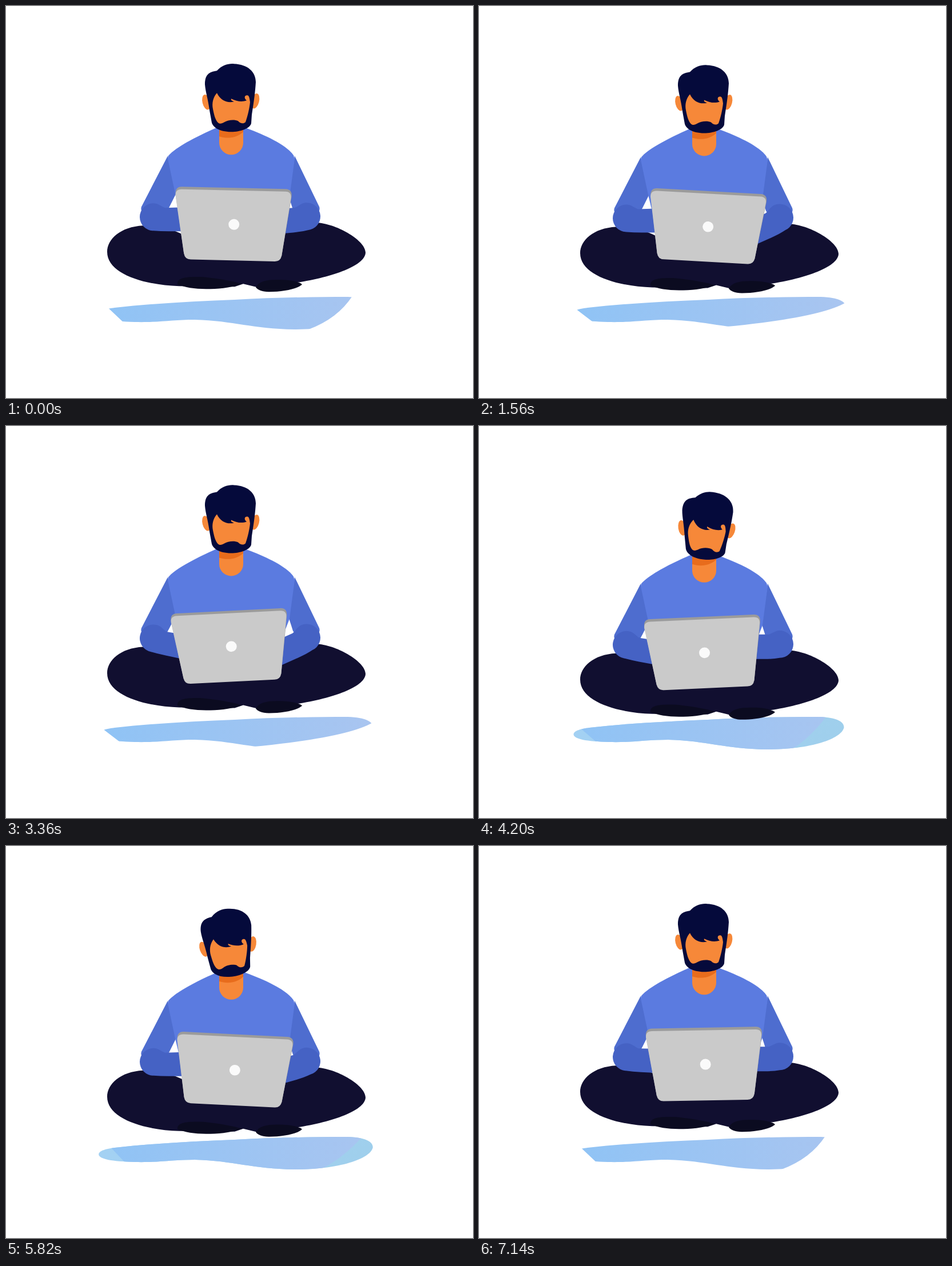
Animation of 817 by 686 pixels, one loop 7200 ms. Source, as an HTML page:

```html
<!DOCTYPE html>
<html lang="en">
<head>
<meta charset="utf-8">
<title>Working cross-legged</title>
<style>
  html, body { margin: 0; width: 100%; height: 100%; overflow: hidden; background: #fff; }
  svg { display: block; width: 100vw; height: 100vh; }
</style>
</head>
<body>
<svg viewBox="0 0 817 686">
  <defs>
    <linearGradient id="coreFill">
      <stop offset="0" stop-color="#8fc3f5"/><stop offset="1" stop-color="#a9c5f0"/>
    </linearGradient>
    <linearGradient id="endFill">
      <stop offset="0" stop-color="#a3d1f3"/><stop offset="1" stop-color="#9fcfec"/>
    </linearGradient>
    <path id="pool" d="M162,540C162,533 175,530 190,528C260,520 330,517 400,514C470,510 540,509 598,509C630,510 642,518 642,527C640,545 590,566 505,566C430,565 400,551 330,549C290,549 270,554 225,553C185,552 163,548 162,540Z"/>
    <clipPath id="coreClip"><path id="cut"/></clipPath>
  </defs>

  <g id="shadow">
    <use id="ends" href="#pool" fill="url(#endFill)"/>
    <g clip-path="url(#coreClip)"><use href="#pool" fill="url(#coreFill)"/></g>
  </g>

  <g id="body">
    <path fill="#110f30" d="M240,384C200,386 177,408 177,430C177,468 240,488 303,490L400,491L415,486L440,492L514,483C580,472 629,452 629,431C629,411 582,382 545,379L480,386V400H310C290,390 265,384 240,384Z"/>
    <g fill="#0b0b20">
      <path d="M300,487C298,474 320,473 345,474C375,477 400,482 413,486C390,494 370,495 350,495C330,495 312,492 300,487Z"/>
      <path d="M437,492C443,480 460,478 485,479C505,480 515,484 518,487C510,495 485,500 460,500C447,500 440,496 437,492Z"/>
    </g>
    <g fill="#4e6dcf">
      <path d="M283,262L237,351Q234,360 245,366L280,362L286,351L297,329Z"/>
      <path d="M505,262L548,351Q551,360 540,366L506,362L502,356L495,334Z"/>
    </g>
    <path fill="#5b7be0" d="M370,212C340,225 297,246 284,262L283,267L296,328L302,353H489L496,335L505,267L503,261C490,242 450,224 416,212Z"/>
    <path id="leftArm" fill="#4562c4" d="M258,393A24,24 0 0 1 258,345C266,345 271,350 278,353L340,351V394H285Q270,394 258,393Z"/>
    <path id="rightArm" fill="#4562c4" d="M526,392A24,24 0 0 0 526,344C518,344 513,350 506,351H440V394H500Q515,394 526,392Z"/>
    <path fill="#f68839" d="M373,195H415V239A21,21 0 0 1 373,239Z"/>
    <path fill="#e86c1c" d="M373,205H415V220C405,230 388,233 373,228Z"/>

    <g id="head">
      <g fill="#f68839">
        <ellipse cx="350.5" cy="168" rx="6.8" ry="13.5" transform="rotate(-14 350.5 168)"/>
        <ellipse cx="436" cy="166" rx="6.8" ry="13.5" transform="rotate(14 436 166)"/>
      </g>
      <path fill="#050a3b" d="M348,137C348,120 355,115 369,113C378,103 390,100 399,101C423,102 437,115 437,133C436,150 434,165 430,190L429,205C427,214 410,220 394,220C372,220 362,211 360,204L356,182C353,160 349,150 348,137Z"/>
      <path fill="#f68839" d="M369,152C362,160 360,170 362,180C364,190 366,199 371,204C375,207 378,205 382,203C388,199 400,198 406,201C410,206 416,206 419,203C423,192 426,178 427,168C426,160 425,156 422,156C417,156 416,161 421,165C413,168 404,167 394,162C393,164 395,166 399,167C388,170 376,166 369,152Z"/>
    </g>

    <g id="laptop">
      <path fill="#9b9b9b" d="M305,318H486Q498,318 497,331L482,435H311L294,331Q293,318 305,318Z"/>
      <path fill="#cacaca" d="M305,322.500H486Q497,322.500 496,334L482,435Q480,445 470,445H323Q313,445 311,435L294,334Q293,322.500 305,322.500Z"/>
      <circle cx="397.300" cy="382" r="9.500" fill="#fafafa"/>
    </g>
  </g>
</svg>
<script>
const STEP = 60, LOOP = 7200, DROP = 17.2;
const el = id => document.getElementById(id);
const set = (id, name, value) => el(id).setAttribute(name, value);
const turn = (id, angle, x, y, tall = 1) => set(id, 'transform',
  `translate(${x} ${y}) rotate(${angle}) scale(1 ${tall}) translate(${-x} ${-y})`);
const linear = u => u;
const smooth = u => (1 - Math.cos(Math.PI * u)) / 2;

// Each key is [position, ...values]
function keyed(keys, p, ease = smooth) {
  if (p <= keys[0][0]) return keys[0].slice(1);
  for (let i = 1; i < keys.length; i++) {
    const a = keys[i - 1], b = keys[i];
    if (p <= b[0]) {
      const k = ease((p - a[0]) / (b[0] - a[0]));
      return a.slice(1).map((v, j) => v + (b[j + 1] - v) * k);
    }
  }
  return keys[keys.length - 1].slice(1);
}

const headKeys = [[240, 0], [600, 4.8], [1140, 4.8], [1440, 0], [1800, 0], [2130, -4.8], [2700, -4.8], [3060, 0]];
const leftKeys = [[330, 0], [510, 12], [600, 12], [735, 0]];
const rightKeys = [[0, 0], [30, 5], [90, 16], [150, 24], [210, 0]];
// Body drop, then x of the shadow's left cut and of the right cut's top, bottom and bend
const cutKeys = [
  [0, 151, 600, 547, 575], [2.4, 130, 655, 375, 625], [5, 160, 650, 600, 625],
  [8.5, 158, 625, 550, 590], [17, 130, 603, 548, 575]
];

function draw(now) {
  const t = Math.floor(now % LOOP / STEP) * STEP + STEP / 2;
  const drop = 0.2 + DROP * smooth(t % 1800 / 900);
  const beat = t % 720, a = beat / 720 * 2 * Math.PI;

  set('body', 'transform', `translate(0 ${drop})`);
  turn('head', keyed(headKeys, t % 3600)[0], 394, 225);
  // The lid leans back a little as it tips sideways
  const tip = 0.15 + 3.4 * Math.sin(a) + 0.4 * Math.sin(3 * a);
  turn('laptop', tip, 397, 445, 1.006 - 0.0034 * tip * tip);
  turn('leftArm', keyed(leftKeys, beat)[0], 258, 369);
  turn('rightArm', -keyed(rightKeys, t % 360, linear)[0], 526, 368);

  const [left, top, bottom, bend] = keyed(cutKeys, drop, linear);
  set('cut', 'd', `M${left},500H${top}V508Q${bend},547 ${bottom},566V575H228Z`);
  set('ends', 'opacity', drop > 6.5 ? 1 : 0);
  const wide = 1 - 0.0027 * Math.max(0, drop - 8.5);
  set('shadow', 'transform', `translate(402 0) scale(${wide} 1) translate(-402 0)`);
}

const start = performance.now();
function tick() {
  draw(performance.now() - start);
  requestAnimationFrame(tick);
}
tick();
</script>
</body>
</html>
```
